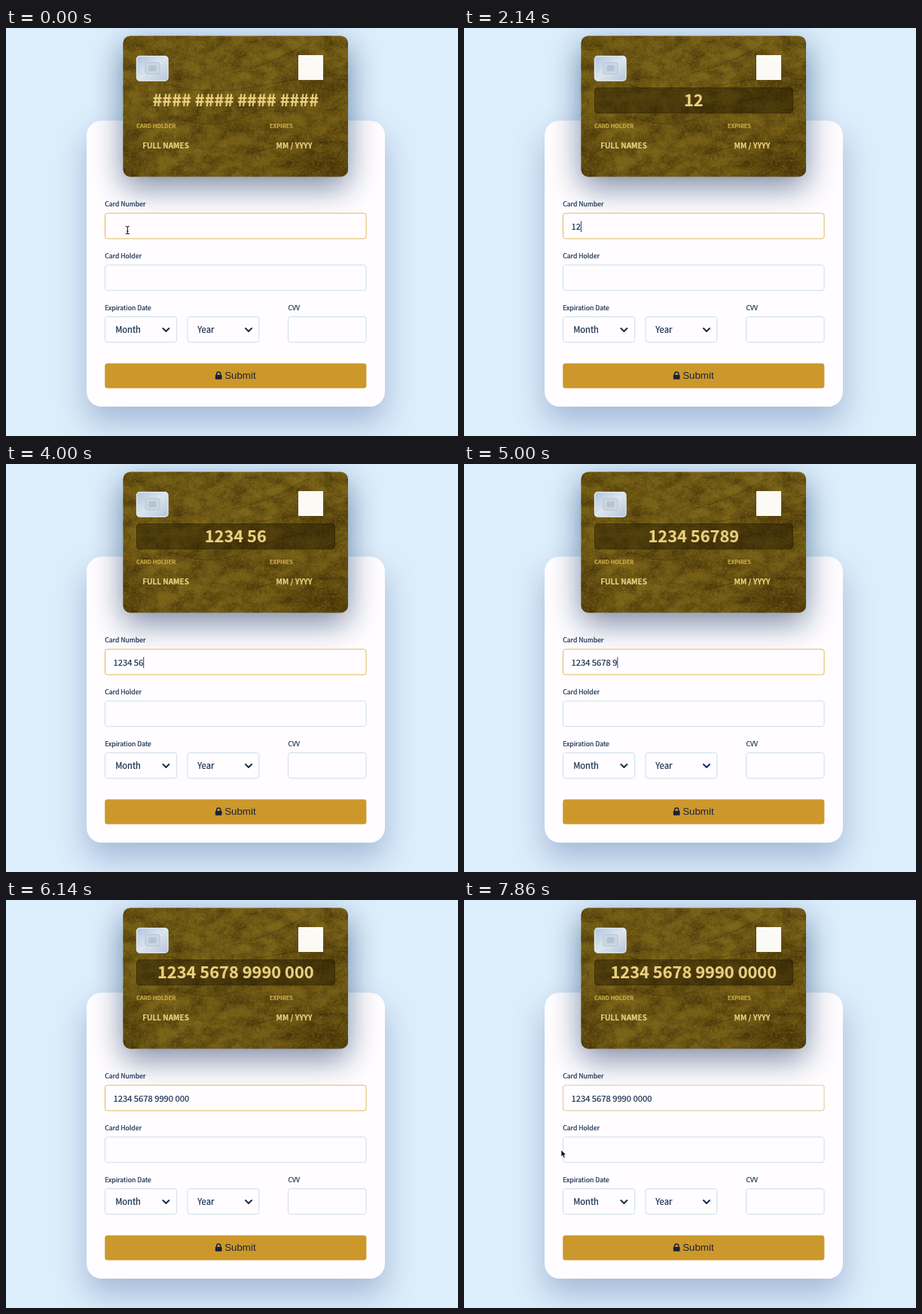
These frames come from a looping animation (600 by 542 pixels, 8000 ms). An HTML page:

```html
<!DOCTYPE html>
<html lang="en">
<head>
<meta charset="utf-8">
<title>Card form</title>
<style>
html, body { margin: 0; width: 100%; height: 100%; overflow: hidden; background: #dcedfb; }
svg { display: block; width: 100%; height: 100%; }
text { font-family: "Noto Sans CJK SC", "Noto Sans CJK JP", "Noto Sans CJK", "Open Sans", sans-serif; fill: #17304f; white-space: pre; }
.label, .value { stroke: #17304f; stroke-width: .22; }
.label { font-size: 8.7px; }
.value { font-size: 11.2px; }
.gold { font-weight: 700; fill: #ead080; stroke: #ead080; stroke-width: .2; }
.cap { font-size: 7.45px; fill: #c9a944; stroke: #c9a944; }
.field { fill: #fffdff; stroke: #cbdbe4; stroke-width: .9; }
</style>
</head>
<body>
<svg viewBox="0 0 600 542">
  <defs>
    <filter id="blur" x="-40%" y="-40%" width="180%" height="180%"><feGaussianBlur stdDeviation="21"/></filter>
    <filter id="soft" x="-50%" y="-50%" width="200%" height="200%"><feGaussianBlur stdDeviation="12"/></filter>
    <filter id="dark" x="0" y="0" width="100%" height="100%" color-interpolation-filters="sRGB">
      <feTurbulence type="fractalNoise" baseFrequency=".05 .07" numOctaves="5" seed="11"/>
      <feColorMatrix values="0 0 0 0 .2  0 0 0 0 .13  0 0 0 0 .01  1.1 0 0 0 -.34"/>
    </filter>
    <filter id="light" x="0" y="0" width="100%" height="100%" color-interpolation-filters="sRGB">
      <feTurbulence type="fractalNoise" baseFrequency=".3 .4" numOctaves="2" seed="4"/>
      <feColorMatrix values="0 0 0 0 .58  0 0 0 0 .49  0 0 0 0 .15  .9 0 0 0 -.36"/>
    </filter>
    <linearGradient id="base" x1="0" y1="0" x2="1" y2="1">
      <stop offset="0" stop-color="#6d5711"/><stop offset=".4" stop-color="#7a6318"/><stop offset="1" stop-color="#6c5511"/>
    </linearGradient>
    <linearGradient id="metal" x1="0" y1="0" x2="1" y2="1">
      <stop offset="0" stop-color="#a9bfe0"/><stop offset=".5" stop-color="#dbe4ea"/><stop offset="1" stop-color="#b0bfda"/>
    </linearGradient>
    <pattern id="hatch" width="3" height="3" patternUnits="userSpaceOnUse" patternTransform="rotate(35)">
      <path d="M0 0H3" stroke="#e6eef8" stroke-width="1" opacity=".55"/>
    </pattern>
    <clipPath id="cardClip"><rect x="155.5" y="10.5" width="298.5" height="187" rx="9.5"/></clipPath>
  </defs>

  <rect width="600" height="542" fill="#dcedfb"/>
  <rect x="107" y="144" width="396" height="380" rx="20" fill="#5a72a4" opacity=".42" filter="url(#blur)"/>
  <rect x="107" y="123" width="396" height="380" rx="20" fill="#fffdff"/>
  <rect x="155.5" y="24.5" width="298.5" height="187" rx="9.5" fill="#0e2a5a" opacity=".55" filter="url(#blur)"/>

  <g clip-path="url(#cardClip)">
    <rect x="155" y="10" width="300" height="189" fill="url(#base)"/>
    <g fill="#2f2003" opacity=".42" filter="url(#soft)">
      <ellipse cx="415" cy="76" rx="46" ry="16"/>
      <ellipse cx="163" cy="165" rx="18" ry="46"/>
      <ellipse cx="290" cy="122" rx="60" ry="9"/>
      <ellipse cx="420" cy="182" rx="50" ry="20"/>
    </g>
    <rect x="155" y="10" width="300" height="189" filter="url(#dark)"/>
    <rect x="155" y="10" width="300" height="189" filter="url(#light)"/>
    <g fill="none" stroke="#2f2003" stroke-width="1.2" opacity=".28">
      <path d="M215 75Q270 90 330 78T440 62"/>
      <path d="M225 118Q270 138 320 116T400 92"/>
      <path d="M320 168Q370 150 450 152"/>
      <path d="M300 60Q350 50 400 20"/>
    </g>
    <rect id="focus" fill="#241800" fill-opacity=".46" stroke="#2a1d02" stroke-opacity=".6"/>
  </g>

  <rect x="173.5" y="37.5" width="41.5" height="32.5" rx="4" fill="url(#metal)"/>
  <rect x="173.5" y="37.5" width="41.5" height="32.5" rx="4" fill="url(#hatch)" stroke="#e3eaf2" stroke-width="1.4"/>
  <rect x="185" y="46" width="19" height="15" rx="2" fill="#cbd7e0" stroke="#b3c2d4"/>
  <rect x="189.5" y="49.5" width="10" height="8" rx="1" fill="#b3c3d6"/>
  <rect x="388" y="36" width="33" height="33" fill="#fbfaf5"/>

  <text id="number" class="gold" x="304.8" y="104.3" font-size="21.8" text-anchor="middle"></text>
  <text class="gold cap" x="173" y="133.2">CARD HOLDER</text>
  <text class="gold cap" x="350" y="133.2">EXPIRES</text>
  <text class="gold" x="181.3" y="159.8" font-size="9.95">FULL NAMES</text>
  <text class="gold" x="358.6" y="159.8" font-size="9.85">MM / YYYY</text>

  <g class="label">
    <text x="131.2" y="237.3">Card Number</text>
    <text x="131.2" y="306">Card Holder</text>
    <text x="131.2" y="374.8">Expiration Date</text>
    <text x="374.5" y="374.8">CVV</text>
  </g>
  <g class="field">
    <rect id="input" x="131.5" y="246.1" width="346.6" height="33.8" rx="3"/>
    <rect x="131.5" y="314.9" width="346.6" height="33.8" rx="3"/>
    <rect x="131.5" y="383.6" width="95.2" height="33.8" rx="3"/>
    <rect x="241" y="383.6" width="94.8" height="33.8" rx="3"/>
    <rect x="374.5" y="383.6" width="103.6" height="33.8" rx="3"/>
  </g>
  <text id="typed" class="value" x="142.5" y="268.2"></text>
  <text class="value" x="145.2" y="405.3">Month</text>
  <text class="value" x="254.2" y="405.3">Year</text>
  <path d="M208.4 399l4 4 4-4M318 399l4 4 4-4" fill="none" stroke="#17304f" stroke-width="2" stroke-linecap="round" stroke-linejoin="round"/>

  <rect x="131.2" y="445.6" width="347.2" height="33" rx="3.5" fill="#cd982b"/>
  <g fill="#1a2238">
    <rect x="277.8" y="460.8" width="8.8" height="6" rx="1"/>
    <path d="M279.6 461.3v-1.7a2.6 2.6 0 0 1 5.2 0v1.7" fill="none" stroke="#1a2238" stroke-width="1.4"/>
    <text x="290.2" y="466.2" style="font:13.3px 'Liberation Sans',Arial,sans-serif;fill:#1a2238">Submit</text>
  </g>

  <rect id="caret" y="256.5" width=".9" height="14.5" fill="#17304f"/>
  <path id="beam" d="M-2.5-5Q0-5 0-3.5Q0-5 2.5-5M0-3.5V3.5M-2.5 5Q0 5 0 3.5Q0 5 2.5 5M-1.3 1.5H1.3" fill="none" stroke="#1b1b1f" stroke-width="1.1"/>
  <path id="arrow" d="M0 0V9.2L2.1 7.3 3.7 10.9 5.3 10.2 3.8 6.7H6.6Z" fill="#0a0a0c" stroke="#fff" stroke-width=".7"/>
</svg>
<script>
const LOOP = 8000, FOCUS = 950, LAG = 150;
const DIGITS = "1234567899900000";
const KEYS = [1710, 2000, 2290, 2710, 3430, 3860, 4290, 4570, 4980, 5140, 5290, 5400, 5470, 5550, 5620, 6290];
const CARD_BOX = [155.5, 10.5, 298.5, 187, 9.5], NUMBER_BOX = [173.5, 79.5, 263, 33.5, 4];
const el = Object.fromEntries([...document.querySelectorAll("[id]")].map(e => [e.id, e]));

const clamp = v => Math.max(0, Math.min(1, v));
const mix = (a, b, k) => a + (b - a) * k;
const ramp = (t, from, len) => clamp((t - from) / len);
const smooth = k => k * k * (3 - 2 * k);
const group = s => s.replace(/(.{4})(?=.)/g, "$1 ");
const show = (e, on) => e.setAttribute("visibility", on ? "visible" : "hidden");
const setText = (e, s) => { if (e.textContent !== s) e.textContent = s; };

function drawText(t) {
  const n = KEYS.filter(k => k <= t).length;
  const last = n ? KEYS[n - 1] : FOCUS;
  const text = group(DIGITS.slice(0, n));
  // The card adds a new group's space a moment after the field does.
  const late = n > 4 && n % 4 === 1 && t - last < LAG;
  setText(el.typed, text);
  setText(el.number, !n ? "#### #### #### ####"
    : late ? group(DIGITS.slice(0, n - 1)) + DIGITS[n - 1] : text);
  show(el.caret, t >= FOCUS && (t - last) % 1000 < 500);
  el.caret.setAttribute("x", 142.5 + (n ? el.typed.getComputedTextLength() : 0));
}

function drawFocus(t) {
  const k = smooth(ramp(t, FOCUS, 350));
  ["x", "y", "width", "height", "rx"].forEach((name, i) =>
    el.focus.setAttribute(name, mix(CARD_BOX[i], NUMBER_BOX[i], k)));
  el.focus.setAttribute("opacity", k);
  const fade = ramp(t, 7650, 210) * .45;
  const rgb = [221, 178, 68].map((c, i) => mix(c, [203, 219, 228][i], fade));
  el.input.style.stroke = `rgb(${rgb})`;
}

function drawPointer(t) {
  const k = smooth(ramp(t, 7360, 480));
  const x = mix(161.3, 129, k), y = mix(268.5, 332, k);
  const inField = x > 131 && (y < 280 || y > 315);
  const visible = t < 1710 || t >= 7360;
  show(el.beam, visible && inField);
  show(el.arrow, visible && !inField);
  for (const e of [el.beam, el.arrow]) e.setAttribute("transform", `translate(${x} ${y})`);
}

function frame(now) {
  const t = now % LOOP;
  drawText(t);
  drawFocus(t);
  drawPointer(t);
}

const start = performance.now();
(function tick() {
  frame(performance.now() - start);
  requestAnimationFrame(tick);
})();
</script>
</body>
</html>
```
